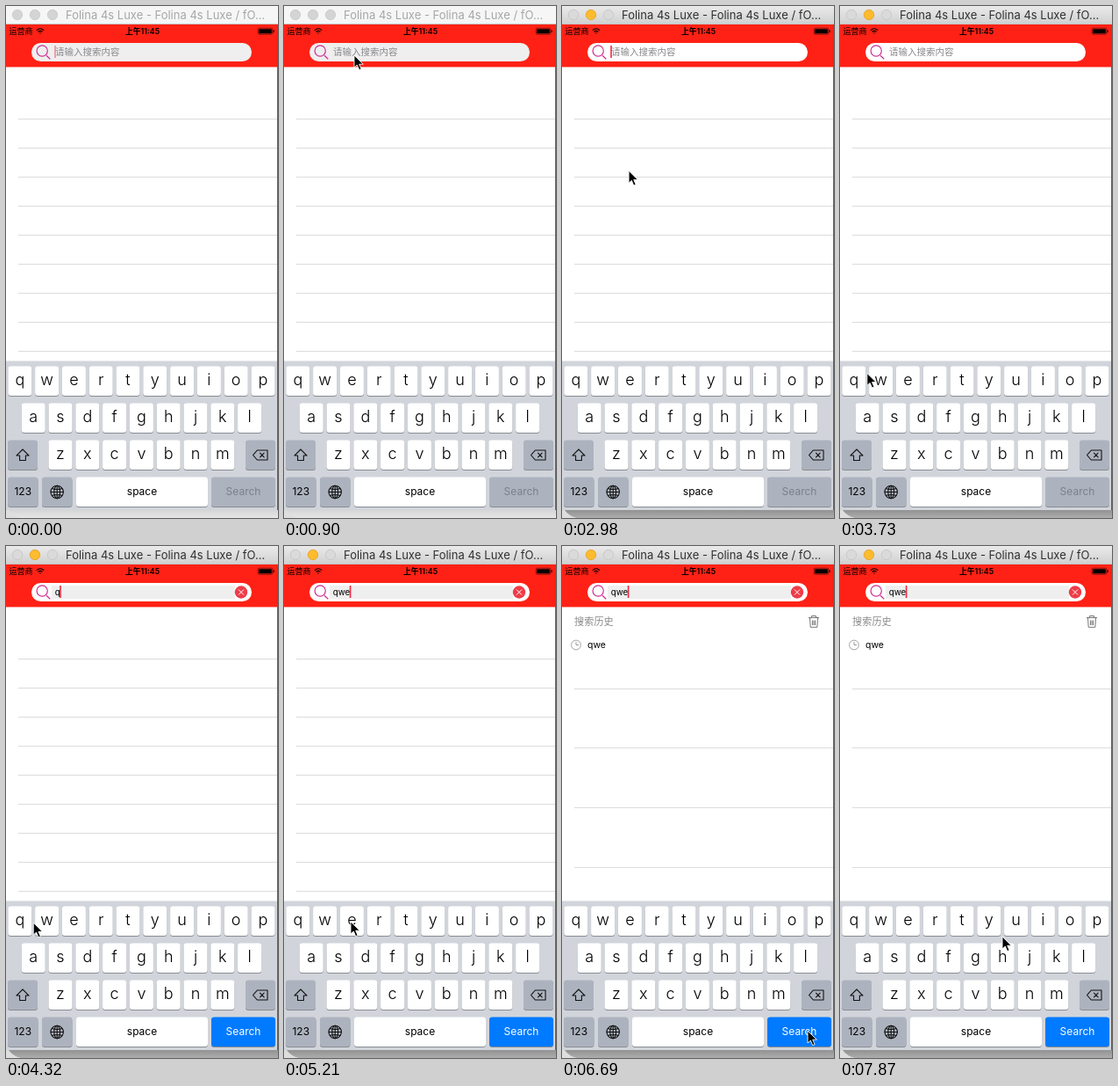
These frames come from a looping animation (310x582 px, 8 s). An HTML page:

```html
<!DOCTYPE html>
<html lang="zh">
<head>
<meta charset="utf-8">
<style>
html, body { margin: 0; width: 100%; height: 100%; overflow: hidden; background: #fff; }
svg { display: block; width: 310px; height: 582px; font-family: Inter, "Noto Sans CJK SC", "Noto Sans CJK", sans-serif; }
.cjk { font-family: "Noto Sans CJK SC", "Noto Sans CJK", sans-serif; }
.icon { fill: none; stroke: #111; stroke-width: 1.1; stroke-linejoin: round; stroke-linecap: round; }
.mid { text-anchor: middle; }
.letter { font-weight: 300; }
#lights { fill: #d4d4d4; stroke: #c8c8c8; stroke-width: .8; }
.active #lights { fill: #dadada; stroke: #c4c4c4; }
.active #yellow { fill: #fdbb2d; stroke: #e2a128; }
#title { fill: #f6f6f6; }
.active #title { fill: url(#bar); }
#name { fill: #a6a6a6; }
.active #name { fill: #303030; }
#field { fill: #efefef; }
.active #field { fill: #fff; }
#shade { fill: url(#dim); }
.active #shade { fill: url(#deep); }
#go { fill: #adb3be; }
#goLabel { fill: #7b808a; }
.typed #go { fill: #007aff; }
.typed #goLabel { fill: #fff; }
.typed #hint, svg:not(.typed) .filled, svg:not(.found) #history { visibility: hidden; }
</style>
</head>
<body>
<svg id="stage" viewBox="0 0 310 582">
  <defs>
    <linearGradient id="bar" x2="0" y2="1"><stop stop-color="#eaeaea"/><stop offset="1" stop-color="#d0d0d0"/></linearGradient>
    <linearGradient id="dim" x2="0" y2="1"><stop stop-color="#d6d6d6"/><stop offset="1" stop-color="#e6e6e6"/></linearGradient>
    <linearGradient id="deep" x2="0" y2="1"><stop stop-color="#929292"/><stop offset="1" stop-color="#adadad"/></linearGradient>
  </defs>
  <rect width="310" height="582" fill="#fff"/>

  <rect id="title" width="310" height="21"/>
  <path d="M0 20.5H310" stroke="#c4c4c4"/>
  <g id="lights">
    <circle cx="13" cy="10" r="5.7"/><circle id="yellow" cx="33" cy="10" r="5.7"/><circle cx="53" cy="10" r="5.7"/>
  </g>
  <text id="name" x="68" y="15" font-size="13">Folina 4s Luxe - Folina 4s Luxe / fO...</text>

  <rect y="21" width="310" height="48.4" fill="#ff2115"/>
  <text class="cjk" x="3.5" y="32" font-size="9">运营商</text>
  <g fill="none" stroke="#000" stroke-width="1.2">
    <path d="M34.8 27.6Q39 23.9 43.2 27.6M36.5 29.4Q39 27.3 41.5 29.4"/>
    <path d="M37.8 30.5L39 31.7L40.2 30.5Z" fill="#000" stroke="none"/>
  </g>
  <text class="mid" x="155.5" y="32" font-size="8.8" font-weight="600">上午11:45</text>
  <rect x="287.2" y="25.2" width="16.6" height="7" rx="1.4" fill="none" stroke="#000" stroke-width=".5"/>
  <rect x="288.2" y="26.2" width="14.6" height="5" rx=".6"/><rect x="304.4" y="27.2" width="1.2" height="3" rx=".6"/>

  <rect id="field" x="29" y="42" width="251" height="21" rx="10.5"/>
  <rect class="filled" x="52" y="45" width="209" height="15" fill="#efefef"/>
  <path d="M46 56.2L50.3 60.2M47.3 51A6.1 6.1 0 1 1 35.1 51A6.1 6.1 0 1 1 47.3 51Z" fill="none" stroke="#d02c92" stroke-width="1.2"/>
  <text id="hint" class="cjk" x="56" y="56" font-size="10.5" fill="#88888c">请输入搜索内容</text>
  <text id="query" x="55.7" y="56" font-size="9.8"></text>
  <rect id="caret" y="45" width="1.6" height="14" fill="#f0283c"/>
  <g class="filled">
    <circle cx="268" cy="52.5" r="7.2" fill="#ee3c48"/>
    <path d="M265 49.5l6 6m0-6l-6 6" stroke="#fff"/>
  </g>

  <path id="rules" stroke="#dcdcdc"/>
  <g id="history">
    <text class="cjk" x="14" y="90" font-size="11.2" fill="#8a8a8a">搜索历史</text>
    <g fill="none" stroke="#777">
      <path d="M281 81.5H293M284.5 81V79.5H289.5V81M282.5 82L283.2 92.3H290.8L291.5 82M285.4 84.5V90M287 84.5V90M288.6 84.5V90"/>
      <circle cx="16" cy="112.5" r="5.4" stroke="#999" stroke-width=".9"/>
      <path d="M16 109V112.5H19" stroke="#999"/>
    </g>
    <text x="29" y="116" font-size="10.5">qwe</text>
  </g>

  <rect y="403.5" width="310" height="170" fill="#d1d5db"/>
  <g id="keys"></g>
  <path class="icon" d="M19 504L26 511H22.4V516.5H15.6V511H12Z"/>
  <path class="icon" d="M281.5 510.5L286.3 505H298V516H286.3ZM289.5 508.2l4.6 4.6m0-4.6l-4.6 4.6"/>
  <g class="icon" stroke-width=".9">
    <circle cx="58.2" cy="552.5" r="7.2"/><ellipse cx="58.2" cy="552.5" rx="3.4" ry="7.2"/>
    <path d="M51 552.5H65.4M58.2 545.3V559.7M52.3 548.5Q58.2 550.5 64.1 548.5M52.3 556.5Q58.2 554.5 64.1 556.5"/>
  </g>
  <rect x="309" y="21" width="1" height="552" fill="#5c5e64"/>
  <rect y="573" width="310" height="9" fill="#dedede"/>
  <path id="shade" d="M3 573H310V582H17Q8 580 3 573Z"/>

  <path id="mouse" d="M0 0V14L3.3 11L5.7 16.6L8.1 15.6L5.7 10.2H10.3Z" stroke="#fff" stroke-width=".9"/>
</svg>
<script>
const $ = id => document.getElementById(id);
const set = (id, attrs) => { for (const k in attrs) $(id).setAttribute(k, attrs[k]); };
const clamp = v => Math.min(1, Math.max(0, v));

// Keyboard
function key(x, row, w, label = "", fill = "#fff", id = "") {
  const y = 409.5 + row * 42, letter = label.length === 1;
  return `<rect x="${x}" y="${y + 1}" width="${w}" height="33.5" rx="3.2" fill="#888c92"/>
    <rect id="${id}" x="${x}" y="${y}" width="${w}" height="33.5" rx="3.2" fill="${fill}"/>
    <text id="${id}Label" class="mid ${letter ? "letter" : ""}" x="${x + w / 2}"
      y="${y + (letter ? 21.6 : 20.4)}" font-size="${letter ? 18 : 12}">${label}</text>`;
}
const grey = "#adb3be";
const letters = ["qwertyuiop", "asdfghjkl", "zxcvbnm"].map((line, row) => {
  const left = 154.4 - (line.length - 1) * 15.4 - 13.5;
  return [...line].map((c, i) => key(left + i * 30.8, row, 27, c)).join("");
});
$("keys").innerHTML = letters.join("") + key(2, 2, 34, "", grey) + key(273, 2, 34, "", grey)
  + key(2, 3, 34.5, "123", grey) + key(41, 3, 34.5, "", grey)
  + key(80, 3, 150, "space") + key(234, 3, 73, "Search", grey, "go");

// Pointer: the places it visits as [time, x, y]
const stops = [
  [450, 197, 499], [890, 80, 56], [1480, 66, 47], [2850, 66, 47], [2960, 76, 187], [3250, 105, 345],
  [3850, 19, 429], [4180, 19, 429], [4450, 47, 427], [4770, 47, 427], [4900, 76, 427], [5550, 76, 427],
  [6050, 320, 590], [6390, 280, 551], [7000, 280, 551], [7860, 185, 444]
];
function pointer(t) {
  const i = stops.findIndex(s => s[0] > t);
  if (i === 0) return [-50, -50];
  const [t1, x1, y1] = stops.at(i), [t0, x0, y0] = stops.at(i < 0 ? -1 : i - 1);
  const u = clamp((t - t0) / (t1 - t0 || 1)), k = u * u * (3 - 2 * u);
  return [x0 + (x1 - x0) * k, y0 + (y1 - y0) * k];
}

// The caret restarts its blink after every input
const strokes = [4180, 4770, 5210], searched = 6690;
function caretOpacity(t) {
  const last = [-610, ...strokes, searched].findLast(s => s <= t);
  const phase = Math.max(0, t - last - 100) / 850 % 1;
  return clamp((.65 - phase) * 10);
}

const rules = (y, step) => {
  let d = "";
  for (; y < 403; y += step) d += `M14 ${Math.floor(y) + .5}H309`;
  return d;
};
const tick = 148.4; // screen refresh of pointer and caret

function draw() {
  const t = performance.now() % 8000, snap = Math.floor(t / tick) * tick;
  const text = "qwe".slice(0, strokes.filter(s => s <= t).length);
  const found = t >= searched;
  const state = $("stage").classList;
  state.toggle("active", t >= 1640);
  state.toggle("typed", text !== "");
  state.toggle("found", found);

  $("query").textContent = text;
  set("caret", {
    x: 55.2 + (text && $("query").getComputedTextLength()),
    opacity: caretOpacity(t < strokes[0] ? snap : t)
  });
  set("rules", { d: found ? rules(162, 67.67) : rules(128, 33) });
  set("mouse", { transform: `translate(${pointer(snap)})` });
  requestAnimationFrame(draw);
}
draw();
</script>
</body>
</html>
```
